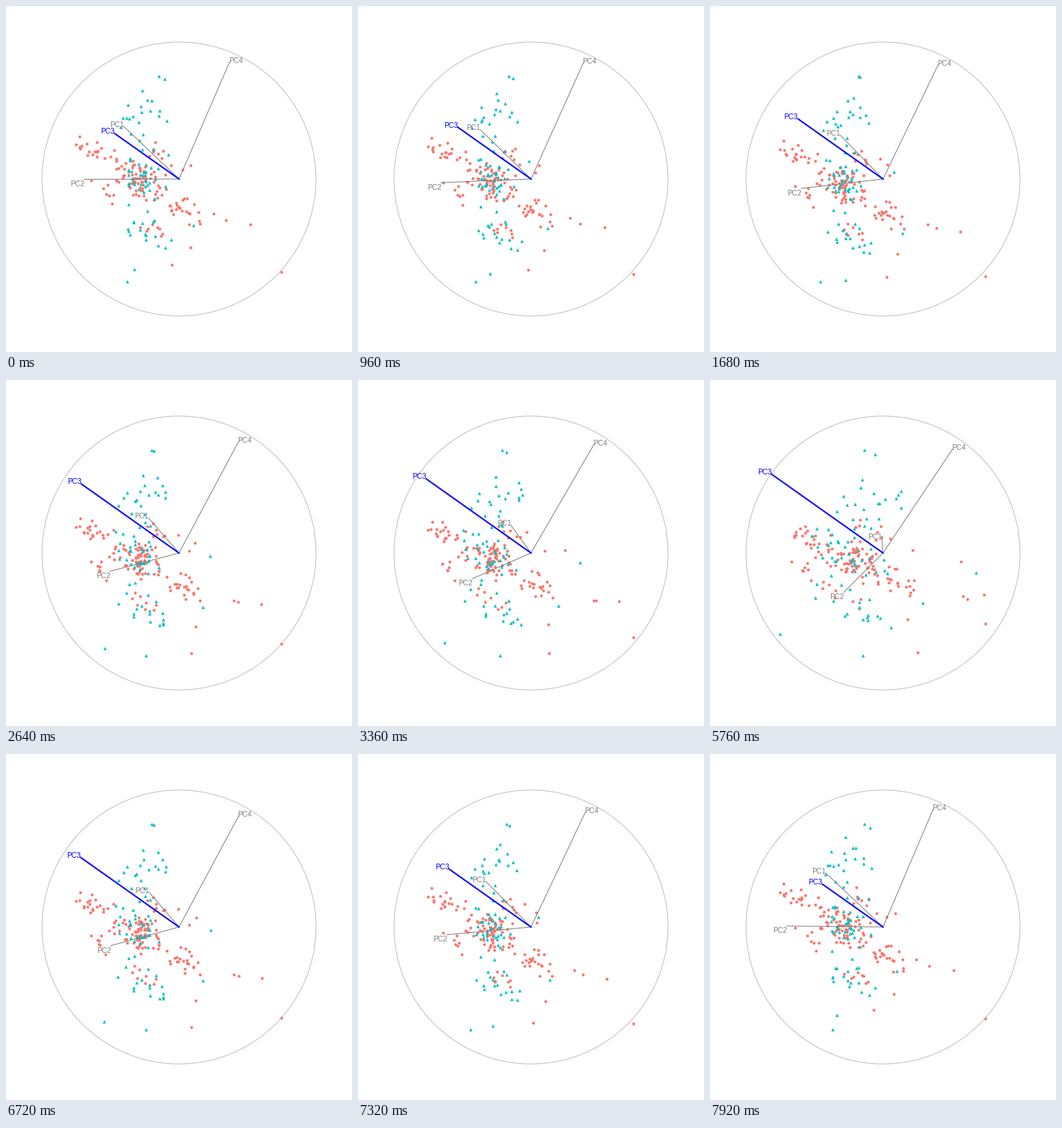
Write a matplotlib script that moves like this. It is 480 px wide and 480 px high and loops after 8000 ms.

```python
import numpy as np
import matplotlib.pyplot as plt
from matplotlib.animation import FuncAnimation

plt.rcParams["font.family"] = "Liberation Sans"

INTERVAL, LOOP = 40, 8000
CENTER, RADIUS = 239.5, 190
LOW, SPAN = np.array([96.5, 96]), 285
PHI_A, PHI_B, STEP = 0.959, 0.1, 0.05
ALONG = np.array([-0.8165, 0.5774])
ACROSS = np.array([0.5774, 0.8165])
RED, TEAL, GREY = "#F8766D", "#00BFC4", "#7f7f7f"

# Points are given as x, y at angle PHI_A and x at angle PHI_B.
ORIGIN = (382, 369, 382)
RED_KEYS = [ORIGIN, (339, 303, 380), (305, 297, 351), (288, 288, 357),
            (207, 189, 348), (230, 359, 288), (256, 335, 274), (97, 193, 117)]
TEAL_KEYS = [(212, 97, 229), (220, 102, 214), (189, 117, 265),
             (225, 206, 369), (168, 382, 97), (178, 365, 212),
             (260, 304, 295)]

# Blobs: count, mean, spread.
RED_BLOBS = [
    (70, (190, 244, 200), (22, 14, 23)),
    (18, (126, 203, 143), (14, 8, 16)),
    (22, (245, 284, 252), (15, 11, 18)),
    (8, (200, 312, 180), (10, 8, 22)),
    (7, (140, 260, 130), (13, 7, 12)),
    (9, (225, 208, 245), (18, 12, 26)),
]
TEAL_BLOBS = [
    (20, (193, 166, 220), (20, 22, 28)),
    (34, (195, 245, 203), (15, 23, 34)),
    (16, (200, 316, 203), (18, 12, 30)),
]

# Label, length along the moved direction at 0 and 90 degrees, fixed part, offset.
AXES = [
    ("PC1", 0, 128, 15.3, (-9.5, -3.5)),
    ("PC2", 0, 130.5, -76.1, (-9.5, 5.5)),
    ("PC4", 0, 44.5, 173.2, (8.7, -3)),
    ("PC3", RADIUS, 0, 0, (-10, -3.8)),
]

rng = np.random.default_rng(7)


def blob(count, mean, spread):
    """Seeded cluster without far tails, leaning down to the right."""
    d = np.clip(rng.normal(size=(count, 3)), -1.7, 1.7) * spread
    d[:, 1] += 0.35 * d[:, 0]
    d[:, 2] += 0.4 * d[:, 0]
    return mean + d


def lift(points):
    """Turn view positions into (u at PHI_A, u at PHI_B, v)."""
    x, y, x_end = ((points - np.array(ORIGIN)) * (1.0615, -1.2088, 0.79)).T
    v = ACROSS[0] * x + ACROSS[1] * y
    u = ALONG[0] * x + ALONG[1] * y
    return np.column_stack([u, (x_end - ACROSS[0] * v) / ALONG[0], v])


def group(keys, blobs):
    return lift(np.vstack([keys] + [blob(*b) for b in blobs]))


reds = group(RED_KEYS, RED_BLOBS)
teals = group(TEAL_KEYS, TEAL_BLOBS)
cloud = np.vstack([reds, teals])


def angle(ms):
    if ms < 720:
        return PHI_A
    if ms < 5640:
        return max(0, PHI_A - STEP * (1 + (ms - 720) // 240))
    return STEP * (1 + (ms - 5640) // 120)


def project(phi):
    """Rotate the cloud, then rescale each direction to the same span."""
    u0, u1, v = cloud.T
    u = u0 * np.sin(phi - PHI_B) + u1 * np.sin(PHI_A - phi)
    u = u / np.sin(PHI_A - PHI_B)
    xy = np.outer(u, ALONG) + np.outer(v, ACROSS)
    xy[:, 1] *= -1
    low, high = xy.min(axis=0), xy.max(axis=0)
    return LOW + SPAN * (xy - low) / (high - low)


fig = plt.figure(figsize=(4.8, 4.8), dpi=100, facecolor="white")
ax = fig.add_axes([0, 0, 1, 1])
ax.set(xlim=(-0.5, 479.5), ylim=(479.5, -0.5))
ax.axis("off")
ax.add_patch(plt.Circle((CENTER, CENTER), RADIUS, fill=False, ec="#bebebe",
                        lw=0.72))

red_dots, = ax.plot([], [], "o", color=RED, ms=2.88, mew=0)
teal_dots, = ax.plot([], [], "^", color=TEAL, ms=3.3, mew=0)

spokes = []
for name, *_ in AXES:
    main = name == "PC3"
    color = "blue" if main else GREY
    line, = ax.plot([], [], color=color, lw=1.44 if main else 0.72)
    label = ax.text(0, 0, name, color=color, size=7.2, ha="center",
                    va="center_baseline")
    spokes.append((line, label))


def draw(i):
    phi = angle(i * INTERVAL)
    xy = project(phi)
    red_dots.set_data(*xy[:len(reds)].T)
    teal_dots.set_data(*xy[len(reds):].T)
    for (line, label), (_, a, b, v, (dx, dy)) in zip(spokes, AXES):
        u = a * np.cos(phi) + b * np.sin(phi)
        x, y = u * ALONG + v * ACROSS
        x, y = CENTER + x, CENTER - y
        line.set_data([CENTER, x], [CENTER, y])
        label.set_position((x + dx, y + dy))
    return [red_dots, teal_dots]


anim = FuncAnimation(fig, draw, frames=LOOP // INTERVAL, interval=INTERVAL,
                     repeat=True, repeat_delay=0, blit=False)
plt.show()
```
